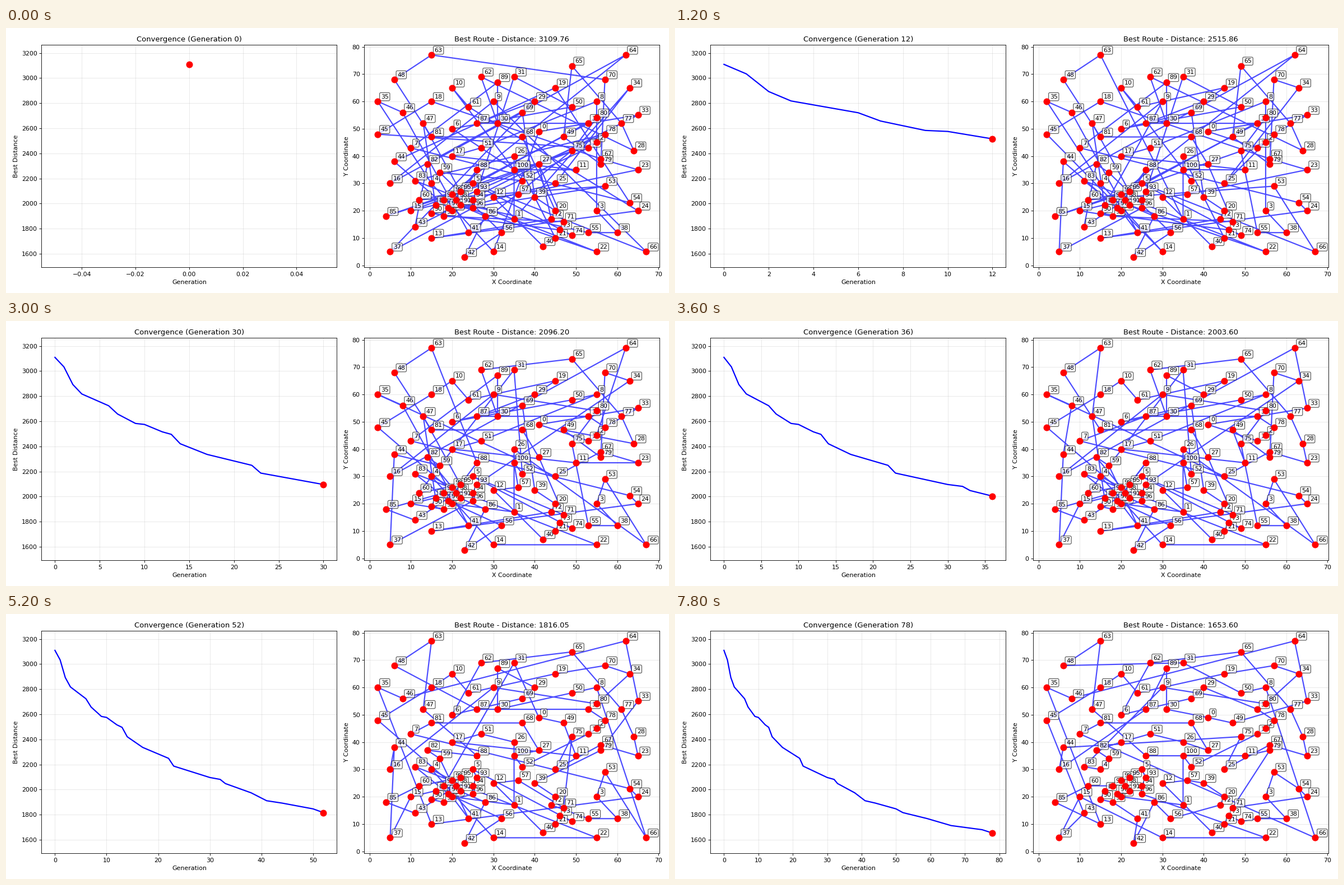
Animation, 1183 px wide and 473 px high, one loop 8 s. Source, as a matplotlib script:

```python
import random
from itertools import combinations

import matplotlib.pyplot as plt
import numpy as np
from matplotlib.animation import FuncAnimation

W, H, DPI = 1183, 473, 78.87
FRAMES, INTERVAL, GENS_PER_FRAME = 40, 200, 2
LAST = (FRAMES - 1) * GENS_PER_FRAME

CITY_X = [
    41, 35, 55, 55, 15, 25, 20, 10, 55, 30, 20, 50, 30, 15, 30, 10, 5, 20, 15, 45,
    45, 45, 55, 65, 65, 45, 35, 41, 64, 40, 31, 35, 53, 65, 63, 2, 20, 5, 60, 40,
    42, 24, 23, 11, 6, 2, 8, 13, 6, 47, 49, 27, 37, 57, 63, 53, 32, 36, 21, 17,
    12, 24, 27, 15, 62, 49, 67, 56, 37, 37, 57, 47, 44, 46, 49, 49, 53, 61, 57, 56,
    55, 15, 14, 11, 16, 4, 28, 26, 26, 31, 15, 22, 18, 26, 25, 22, 25, 19, 20, 18,
    35]
CITY_Y = [
    49, 17, 45, 20, 30, 30, 50, 43, 60, 60, 65, 35, 25, 10, 5, 20, 30, 40, 60, 65,
    20, 10, 5, 35, 20, 30, 40, 37, 42, 60, 52, 69, 52, 55, 65, 60, 20, 5, 12, 25,
    7, 12, 3, 14, 38, 48, 56, 52, 68, 47, 58, 43, 31, 29, 23, 12, 12, 26, 24, 34,
    24, 58, 69, 77, 77, 73, 5, 39, 47, 56, 68, 16, 17, 13, 11, 42, 43, 52, 48, 37,
    54, 47, 37, 31, 22, 18, 18, 52, 35, 67, 19, 22, 24, 27, 24, 27, 21, 21, 26, 18,
    35]
CITIES = np.column_stack([CITY_X, CITY_Y])
GAPS = np.linalg.norm(CITIES[:, None] - CITIES, axis=2)

# Turning points of the best distance
COST_KEYS = {
    0: 3109.76, 1: 3034, 2: 2893, 3: 2818, 6: 2724, 7: 2658, 9: 2583, 10: 2575,
    12: 2515.86, 13: 2496, 14: 2421, 17: 2336, 22: 2249, 23: 2187, 30: 2096.20,
    32: 2081, 33: 2048, 38: 1974, 41: 1911, 44: 1892.03, 50: 1846, 52: 1816.05,
    59: 1769, 66: 1712.87, 75: 1680, LAST: 1653.60}
COST = np.interp(range(LAST + 1), list(COST_KEYS), list(COST_KEYS.values()))

# Long stretches of the last route; short links fill the rest
STRETCHES = [
    (96, 22, 14, 15, 37, 43, 45, 18), (62, 65, 77, 28),
    (24, 71, 79, 11, 88, 47, 63, 48, 31, 50), (27, 68, 81, 7),
    (85, 13, 35, 46, 64, 33, 49), (83, 9, 80, 34, 70, 19, 61),
    (25, 75, 44, 16, 87, 89, 30), (29, 32), (52, 76), (100, 1, 36),
    (42, 86, 56, 72), (6, 69)]


def join_route():
    """Join the stretches with the shortest free links into one route."""
    paths = {city: [city] for city in range(len(CITIES))}

    def link(a, b):
        left, right = paths[a], paths[b]
        if left is right or a not in (left[0], left[-1]) or b not in (right[0], right[-1]):
            return
        left = left if left[-1] == a else left[::-1]
        right = right if right[0] == b else right[::-1]
        joined = left + right
        paths.update((city, joined) for city in joined)

    for stretch in STRETCHES:
        for a, b in zip(stretch, stretch[1:]):
            link(a, b)
    for a, b in sorted(combinations(paths, 2), key=lambda pair: GAPS[pair]):
        link(a, b)
    return paths[0]


def length(route):
    return GAPS[route, np.roll(route, -1)].sum()


def flip(route, rng):
    i, j = sorted(rng.sample(range(len(route) + 1), 2))
    return route[:i] + route[i:j][::-1] + route[j:]


def evolve(trials=80):
    """Work back from the last route, one reversed section per generation."""
    rng = random.Random(7)
    routes = [join_route()]
    surplus = length(routes[0]) - COST[LAST]
    for gen in range(LAST - 1, -1, -1):
        goal = COST[gen] + surplus * gen / LAST
        options = [flip(routes[-1], rng) for _ in range(trials)]
        routes.append(min(options, key=lambda r: abs(length(r) - goal)))
    return routes[::-1]


def add_axes(left, xlabel, ylabel):
    ax = fig.add_axes([left / W, 45.8 / H, 526.9 / W, 397.1 / H])
    ax.set_xlabel(xlabel)
    ax.set_ylabel(ylabel)
    ax.grid(True, alpha=0.3)
    return ax


ROUTES = evolve()

plt.rcParams["font.family"] = "DejaVu Sans"
fig = plt.figure(figsize=((W + 0.01) / DPI, (H + 0.01) / DPI), dpi=DPI)

curve_ax = add_axes(63.4, "Generation", "Best Distance")
curve_ax.set_ylim(1491.5, 3265.25)
curve, = curve_ax.plot([], [], "b-", lw=2)
head, = curve_ax.plot([], [], "ro", ms=10)

map_ax = add_axes(639.4, "X Coordinate", "Y Coordinate")
map_ax.set_xlim(-1.25, 70.25)
map_ax.set_ylim(-0.7, 80.7)
tour, = map_ax.plot([], [], "b-", lw=2, alpha=0.7)
map_ax.scatter(*CITIES.T, c="red", s=100, zorder=5)
for i, spot in enumerate(CITIES):
    map_ax.annotate(str(i), spot, xytext=(5, 5), textcoords="offset points",
                    bbox=dict(boxstyle="round,pad=0.2", fc="white", alpha=0.7))


def update(frame):
    gen = frame * GENS_PER_FRAME
    curve.set_data(range(gen + 1), COST[:gen + 1])
    head.set_data([gen], [COST[gen]])
    margin = 0.05 * gen or 0.055
    curve_ax.set_xlim(-margin, gen + margin)
    curve_ax.set_title(f"Convergence (Generation {gen})")

    route = ROUTES[gen]
    tour.set_data(*CITIES[route + route[:1]].T)
    map_ax.set_title(f"Best Route - Distance: {COST[gen]:.2f}")
    return curve, head, tour


anim = FuncAnimation(fig, update, frames=FRAMES, init_func=lambda: update(0),
                     interval=INTERVAL, repeat=True, repeat_delay=0, blit=False)
plt.show()
```
